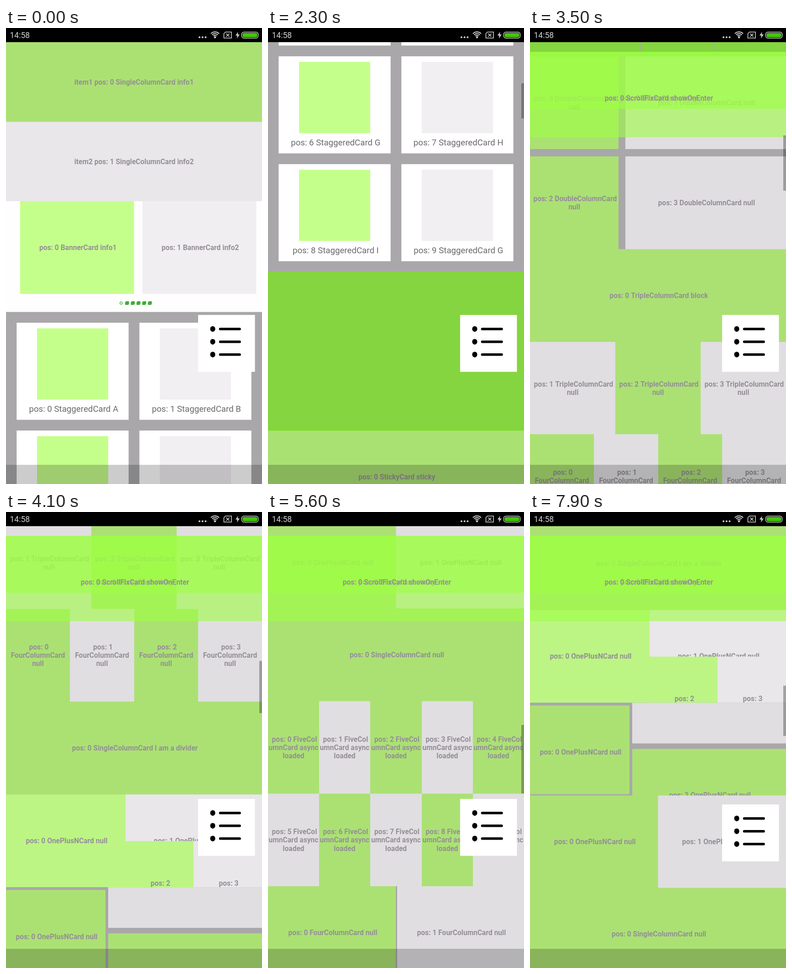
An HTML page with a canvas for the animation above (8000 ms loop, 561 px wide and 998 px high).

```html
<!DOCTYPE html>
<html lang="en">
<head>
<meta charset="utf-8">
<title>Card list</title>
<style>
html, body { margin: 0; width: 561px; height: 998px; overflow: hidden; background: #000; }
canvas { display: block; }
</style>
</head>
<body>
<canvas id="stage" width="561" height="998"></canvas>
<script>
const ctx = document.getElementById('stage').getContext('2d');
const W = 561, H = 998, LOOP = 8000, ROW = 203;
const GREEN = '#abe173', GREY = '#e0dee1', PALE = '#e9e7ea', MINT = '#bcf584';
const LIME = '#c5ff8b', DARK = '#84d53f', GAP = '#a9a7aa';
const VEIL = 'rgba(158,255,67,.6)';
const STICKY_Y = 2172, PIN_Y = 52;

// Each swipe: start, end, scroll from, scroll to
const swipes = [
  [600, 1500, 0, 674], [1500, 2100, 674, 1125], [2200, 2900, 1125, 1751],
  [3000, 3500, 1751, 2516], [3700, 4600, 2516, 3495], [4600, 5500, 3495, 4208]
];
const swipeBack = [7500, 7900, 4208, 3596.5];

// scroll, thumb top, thumb height
const thumbKeys = [
  [0, 31, 76], [541, 68, 76], [1291, 121, 77], [2516, 235, 121],
  [3596, 380, 110], [3623, 384, 110], [3626, 384, 134], [3645, 387, 134], [4208, 466, 150]
];
// time, x, y
const buttonKeys = [
  [5900, 421, 628], [6300, 16, 520], [6800, 241, 581], [7200, 421, 640]
];

const clamp = v => Math.max(0, Math.min(1, v));
const smooth = p => p * p * (3 - 2 * p);

function along(keys, at, ease = p => p) {
  let i = 0;
  while (i < keys.length - 2 && at > keys[i + 1][0]) i++;
  const a = keys[i], b = keys[i + 1];
  const p = ease(clamp((at - a[0]) / (b[0] - a[0])));
  return [a[1] + (b[1] - a[1]) * p, a[2] + (b[2] - a[2]) * p];
}

function scrollAt(t) {
  const [b0, b1, bFrom, bTo] = swipeBack;
  if (t > b0) return bFrom + (bTo - bFrom) * clamp((t - b0) / (b1 - b0));
  let s = 0;
  for (const [t0, t1, from, to] of swipes) {
    if (t <= t0) break;
    const p = clamp((t - t0) / (t1 - t0));
    s = from + (to - from) * (1 - (1 - p) ** 2);
  }
  return s;
}

function rect(x, y, w, h, color) {
  ctx.fillStyle = color;
  ctx.fillRect(x, y, w, h);
}

function label(lines, cx, cy) {
  ctx.font = 'bold 15.58px Roboto, sans-serif';
  ctx.textAlign = 'center';
  ctx.fillStyle = '#948f96';
  lines.forEach((s, i) =>
    ctx.fillText(s, cx, cy + 5.4 + (i - (lines.length - 1) / 2) * 18.26));
}

function card(x, y, w, h, color, ...lines) {
  rect(x, y, w, h, color);
  label(lines, x + w / 2, y + h / 2);
}

// A row of equal columns, alternating colours by position
function columns(y, n, first, ...rest) {
  const w = W / n;
  for (let i = 0; i < n; i++) {
    const pos = first + i, x = Math.round(i * w);
    const lines = [` pos: ${pos}${rest[0]}`, ...rest.slice(1)];
    card(x, y, Math.round((i + 1) * w) - x, ROW, pos % 2 ? GREY : GREEN, ...lines);
  }
}

function banner() {
  rect(0, 379, W, 243, '#fefefe');
  card(31, 379, 249.5, 203, LIME, ' pos: 0 BannerCard info1');
  card(299, 379, 249.5, 203, '#f0eef1', ' pos: 1 BannerCard info2');
  ctx.strokeStyle = ctx.fillStyle = '#3fae36';
  ctx.lineWidth = 1.2;
  ctx.beginPath();
  ctx.arc(252.2, 602, 2.6, 0, 7);
  ctx.stroke();
  for (let i = 0; i < 5; i++) {
    ctx.beginPath();
    ctx.roundRect(261 + i * 12.5, 598, 8.6, 8, [3.5, 1, 3.5, 1]);
    ctx.fill();
  }
}

function staggered() {
  rect(0, 621.5, W, 1203, GAP);
  ctx.font = '18.7px Roboto, sans-serif';
  ctx.textAlign = 'center';
  [...'ABCDEFGHIG'].forEach((ch, i) => {
    const x = i % 2 ? 292.3 : 23.3, y = 645 + (i >> 1) * 236;
    rect(x, y, 245.4, 212.5, '#fff');
    rect(x + 44.7, y + 12.3, 156, 156, i % 2 ? '#f1eff2' : LIME);
    ctx.fillStyle = '#6c6a6d';
    ctx.fillText(` pos: ${i} StaggeredCard ${ch}`, x + 122.7, y + 195);
  });
}

function doubles() {
  rect(0, 2578, W, 422, GAP);
  for (let r = 0; r < 2; r++) {
    const y = 2578 + r * 219;
    card(0, y, 194, ROW, GREEN, ` pos: ${r * 2} DoubleColumnCard`, 'null');
    card(209, y, 352, ROW, GREY, ` pos: ${r * 2 + 1} DoubleColumnCard null`);
  }
}

function onePlus() {
  const name = n => ` pos: ${n} OnePlusNCard null`;
  card(0, 3811, 262, ROW, MINT, name(0));
  card(262, 3811, 299, ROW, PALE, name(1));
  card(262, 3913, 149, ROW, MINT, ' pos: 2', 'OnePlusNCard null');
  card(411, 3913, 150, ROW, PALE, ' pos: 3', 'OnePlusNCard null');

  rect(0, 4014, W, ROW, GAP);
  rect(0, 4020, 218, 194, GREEN);
  label([name(0)], 109, 4122);
  rect(224, 4014, 337, 89, GREY);
  card(224, 4115, 337, ROW, GREEN, name(2));

  card(0, 4217, 280.5, ROW, GREEN, name(0));
  card(280.5, 4217, 280.5, ROW, GREY, name(1));
}

function content() {
  card(0, 31, W, 174.5, GREEN, 'item1 pos: 0 SingleColumnCard info1');
  card(0, 205.3, W, 174.2, PALE, 'item2 pos: 1 SingleColumnCard info2');
  banner();
  staggered();
  rect(0, 1824, W, 349, DARK);
  rect(0, 2359, W, 219, DARK);
  rect(242, 2359, 3, 207, GAP);
  rect(401, 2359, 3, 207, GAP);
  doubles();
  card(0, 3000, W, ROW, GREEN, ' pos: 0 TripleColumnCard block');
  ['0', '1', '2'].forEach((_, i) =>
    card(i * 187, 3203, 187, ROW, i % 2 ? GREEN : GREY, ` pos: ${i + 1} TripleColumnCard`, 'null'));
  columns(3405, 4, 0, '', 'FourColumnCard', 'null');
  card(0, 3608, W, ROW, GREEN, ' pos: 0 SingleColumnCard I am a divider');
  onePlus();
  card(0, 4419, W, ROW, GREEN, ' pos: 0 SingleColumnCard null');
  columns(4622, 5, 0, ' FiveCol', 'umnCard async', 'loaded');
  columns(4824.5, 5, 5, ' FiveCol', 'umnCard async', 'loaded');
  rect(0, 5027, W, ROW, GAP);
  card(0, 5027, 280, ROW, GREEN, ' pos: 0 FourColumnCard null');
  card(283, 5027, 278, ROW, GREY, ' pos: 1 FourColumnCard null');
}

function overlays(s) {
  const y = Math.max(PIN_Y, STICKY_Y - s);
  if (y < H) {
    rect(0, y, W, 187, VEIL);
    label([' pos: 0 StickyCard sticky'], W / 2, y + 101.5);
  }
  if (s > 2200) {
    rect(0, PIN_Y, W, 125, VEIL);
    label([' pos: 0 ScrollFixCard showOnEnter'], W / 2, 153.5);
  }
}

function scrollbar(t, s) {
  let a = t < 700 ? 0 : 1;
  if (t >= 6000 && t < 7600) a = clamp((6200 - t) / 300);
  const [y, h] = along(thumbKeys, s);
  rect(555, y, 6, h, `rgba(0,0,0,${0.3 * a})`);
}

function button(t) {
  const [x, y] = along(buttonKeys, t, smooth);
  rect(x, y, 124.5, 124.5, '#fff');
  ctx.fillStyle = ctx.strokeStyle = '#000';
  ctx.lineWidth = 5.6;
  ctx.lineCap = 'round';
  for (let i = 0; i < 3; i++) {
    const cy = y + 30.7 + i * 28;
    ctx.beginPath();
    ctx.ellipse(x + 32, cy, 5.6, 6.2, 0, 0, 7);
    ctx.fill();
    ctx.beginPath();
    ctx.moveTo(x + 48.5, cy);
    ctx.lineTo(x + 91, cy);
    ctx.stroke();
  }
}

function statusBar() {
  rect(0, 0, W, 31, '#000');
  ctx.fillStyle = ctx.strokeStyle = '#d0d0d0';
  ctx.font = '17.5px Roboto, sans-serif';
  ctx.textAlign = 'left';
  ctx.fillText('14:58', 8.5, 22.3);
  for (let i = 0; i < 3; i++) {
    ctx.beginPath();
    ctx.arc(424 + i * 6.7, 20.3, 2, 0, 7);
    ctx.fill();
  }
  // wifi
  ctx.lineCap = 'butt';
  ctx.lineWidth = 2;
  for (const r of [5, 8.7, 12.4]) {
    ctx.beginPath();
    ctx.arc(458, 21, r, -Math.PI * 0.76, -Math.PI * 0.24);
    ctx.stroke();
  }
  ctx.beginPath();
  ctx.arc(458, 20.2, 2.2, 0, 7);
  ctx.fill();
  // sim card
  ctx.lineWidth = 1.6;
  ctx.beginPath();
  ctx.moveTo(481, 8.8);
  ctx.lineTo(494, 8.8);
  ctx.lineTo(494, 22);
  ctx.lineTo(477.5, 22);
  ctx.lineTo(477.5, 12.3);
  ctx.closePath();
  ctx.moveTo(482.5, 12.3);
  ctx.lineTo(489.5, 19);
  ctx.moveTo(489.5, 12.3);
  ctx.lineTo(482.5, 19);
  ctx.stroke();
  // charging bolt
  ctx.beginPath();
  ctx.moveTo(508.5, 8.5);
  ctx.lineTo(503, 16.5);
  ctx.lineTo(507, 16.5);
  ctx.lineTo(506, 23);
  ctx.lineTo(512, 14.3);
  ctx.lineTo(508, 14.3);
  ctx.fill();
  // battery
  ctx.lineWidth = 1.4;
  ctx.beginPath();
  ctx.roundRect(516.3, 9, 36.5, 13.2, 5);
  ctx.stroke();
  ctx.fillStyle = '#43c50b';
  ctx.beginPath();
  ctx.roundRect(518.2, 10.9, 32.7, 9.4, 3.5);
  ctx.fill();
}

function draw(t) {
  const s = scrollAt(t);
  rect(0, 0, W, H, '#bbb5bb');
  ctx.save();
  ctx.translate(0, -s);
  content();
  ctx.restore();
  overlays(s);
  scrollbar(t, s);
  button(t);
  rect(0, 956, W, 42, 'rgba(0,0,0,.2)');
  statusBar();
}

const start = performance.now();
function tick() {
  const t = (performance.now() - start) % LOOP;
  draw(Math.floor(t / 100) * 100);
  requestAnimationFrame(tick);
}
tick();
</script>
</body>
</html>
```
